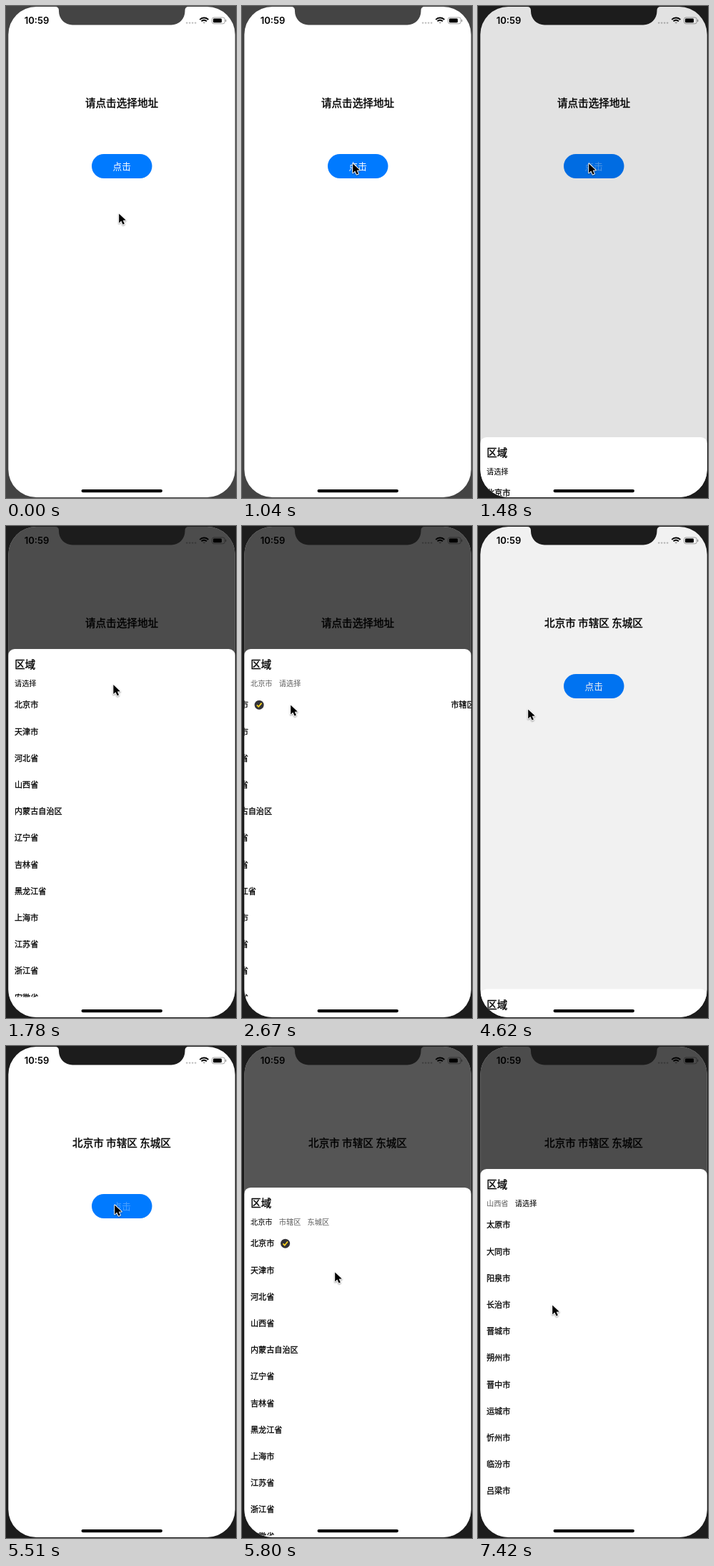
These frames come from a looping animation (322 px wide and 688 px high, 8 s). An HTML page with a canvas:

```html
<!DOCTYPE html>
<html lang="zh-CN">
<head>
<meta charset="utf-8">
<title>区域选择</title>
<style>
html, body { margin: 0; width: 100%; height: 100%; overflow: hidden; background: #1c1c1c; }
canvas { display: block; width: 322px; height: 688px; }
</style>
</head>
<body>
<canvas id="stage"></canvas>
<script>
const W = 322, H = 688, LOOP = 8000;
const TICK = 148.5;               // the screen refreshes once per tick
const PAGE = 317, SHEET = 516, ROW = 37.2;
const CJK = '"Noto Sans CJK SC", "Noto Sans CJK", sans-serif';

const provinces = '北京市 天津市 河北省 山西省 内蒙古自治区 辽宁省 吉林省 黑龙江省 上海市 江苏省 浙江省 安徽省'.split(' ');
const districts = '东城区 西城区 朝阳区 丰台区 石景山区 海淀区 门头沟区 房山区 通州区 顺义区 昌平区 大兴区'.split(' ');
const cities = '太原市 大同市 阳泉市 长治市 晋城市 朔州市 晋中市 运城市 忻州市 临汾市 吕梁市'.split(' ');

// tick, x, y of the pointer tip
const pointerPath = [
  [1, 158, 290], [7, 155, 220], [11, 155, 220], [17, 68, 250], [22, 68, 250],
  [23, 70, 254], [28, 70, 254], [29, 70, 255], [31, 70, 256], [36, 152, 222],
  [37, 152, 222], [39, 130, 316], [42, 112, 352], [43, 112, 352], [46, 104, 362]
];

const canvas = document.getElementById('stage');
const ctx = canvas.getContext('2d');
const dpr = window.devicePixelRatio || 1;
canvas.width = W * dpr;
canvas.height = H * dpr;

const clamp = v => Math.max(0, Math.min(1, v));
const ease = p => p < .5 ? 2 * p * p : 1 - 2 * (1 - p) * (1 - p);
const ramp = (k, start) => ease(clamp((k - start) * TICK / 300));

function pointerAt(k) {
  const i = pointerPath.findIndex(p => p[0] >= k);
  if (i < 0) return pointerPath[pointerPath.length - 1].slice(1);
  if (i === 0) return pointerPath[0].slice(1);
  const a = pointerPath[i - 1], b = pointerPath[i];
  const p = ease((k - a[0]) / (b[0] - a[0]));
  return [a[1] + (b[1] - a[1]) * p, a[2] + (b[2] - a[2]) * p];
}

function stateAt(k) {
  const s = {
    bezel: k < 8 ? '#444' : '#1c1c1c',
    title: k < 30 ? '请点击选择地址' : '北京市 市辖区 东城区',
    open: ramp(k, 9.42) - ramp(k, 29.38) + ramp(k, 37.3),
    label: { 10: .35, 11: .85, 37: .3, 38: .5 }[k] || 1,
    pointer: pointerAt(k)
  };
  if (k < 32) {
    s.scroll = ramp(k, 17.515) + ramp(k, 22.9);
    s.pages = [provinces, ['市辖区'], districts];
    s.picks = [k >= 17 ? 0 : -1, k >= 23 ? 0 : -1, k >= 30 ? 0 : -1];
  } else {
    s.scroll = ramp(k, 47.5);
    s.pages = [provinces, cities];
    s.picks = [k < 47 ? 0 : 3, -1];
  }
  if (k < 17) [s.tabs, s.active] = [['请选择'], 0];
  else if (k < 23) [s.tabs, s.active] = [['北京市', '请选择'], k < 20 ? -1 : 1];
  else if (k < 30) [s.tabs, s.active] = [['北京市', '市辖区', '请选择'], k < 26 ? -1 : 2];
  else if (k < 47) [s.tabs, s.active] = [['北京市', '市辖区', '东城区'], k < 32 ? 2 : 0];
  else [s.tabs, s.active] = [['山西省', '请选择'], k < 50 ? -1 : 1];
  return s;
}

function box(x, y, w, h, r, color) {
  ctx.beginPath();
  ctx.roundRect(x, y, w, h, r);
  if (color) {
    ctx.fillStyle = color;
    ctx.fill();
  }
}

function dot(x, y, r, color) {
  ctx.beginPath();
  ctx.arc(x, y, r, 0, 7);
  ctx.fillStyle = color;
  ctx.fill();
}

// y is the middle of the line; weight thickens the strokes
function text(str, x, y, size, color = '#000', weight = 0, align = 'left') {
  ctx.font = `${size}px ${CJK}`;
  ctx.textAlign = align;
  ctx.fillStyle = ctx.strokeStyle = color;
  const base = y + size * .38;
  ctx.fillText(str, x, base);
  if (weight) {
    ctx.lineWidth = weight;
    ctx.lineJoin = 'round';
    ctx.strokeText(str, x, base);
  }
}

function statusBar() {
  ctx.font = '600 13px Inter, sans-serif';
  ctx.textAlign = 'center';
  ctx.fillStyle = '#000';
  ctx.fillText('10:59', 43, 25);
  for (let i = 0; i < 4; i++) dot(253.2 + i * 4, 23.6, 1.2, '#bbb');

  ctx.strokeStyle = '#000';
  ctx.lineWidth = 2;
  ctx.lineCap = 'butt';
  for (const r of [8.2, 5]) {
    ctx.beginPath();
    ctx.arc(277.3, 24.8, r, -Math.PI * .76, -Math.PI * .24);
    ctx.stroke();
  }
  ctx.beginPath();
  ctx.moveTo(277.3, 25);
  ctx.arc(277.3, 24.8, 2.8, -Math.PI * .76, -Math.PI * .24);
  ctx.fill();

  box(288.5, 16, 17.8, 8.8, 2.6);
  ctx.strokeStyle = '#999';
  ctx.lineWidth = .9;
  ctx.stroke();
  box(290, 17.5, 12, 5.8, 1.4, '#000');
  box(307.2, 18.8, 1.2, 3.2, .6, '#999');
}

function check(x, y) {
  dot(x, y, 6.5, '#333338');
  ctx.beginPath();
  ctx.moveTo(x - 3.2, y + .2);
  ctx.lineTo(x - .9, y + 2.6);
  ctx.lineTo(x + 3.4, y - 2.6);
  ctx.strokeStyle = '#ffd51e';
  ctx.lineWidth = 1.7;
  ctx.lineJoin = 'miter';
  ctx.stroke();
}

function sheet(s) {
  const top = 688 - SHEET * s.open;
  box(3, top, 318, SHEET + 4, [9, 9, 0, 0], '#fff');
  text('区域', 12.3, top + 21.6, 14.4, '#000', .4);
  s.tabs.forEach((tab, i) =>
    text(tab, 12 + i * 39.8, top + 47.8, 10.2, i === s.active ? '#000' : '#666', .08));

  ctx.save();
  ctx.beginPath();
  ctx.rect(3, top + 58, 318, 428.5);
  ctx.clip();
  s.pages.forEach((rows, page) => {
    const x = 12 + (page - s.scroll) * PAGE;
    if (x > 322 || x < -PAGE) return;
    rows.forEach((name, i) => {
      const y = top + 78.2 + i * ROW;
      text(name, x, y, 11.1, '#000', .28);
      if (i === s.picks[page]) check(x + name.length * 11.1 + 15.3, y);
    });
  });
  ctx.restore();
}

function notch(color) {
  ctx.beginPath();
  ctx.moveTo(68, 0);
  ctx.lineTo(69, 1);
  ctx.quadraticCurveTo(74, 1, 74, 6.5);
  ctx.arcTo(74, 26.5, 94, 26.5, 19);
  ctx.arcTo(250.5, 26.5, 250.5, 6.5, 19);
  ctx.lineTo(250.5, 6.5);
  ctx.quadraticCurveTo(250.5, 1, 255.5, 1);
  ctx.lineTo(256, 0);
  ctx.fillStyle = color;
  ctx.fill();
}

function pointer([x, y]) {
  ctx.save();
  ctx.translate(x, y);
  ctx.beginPath();
  [[.2, .4], [.2, 13.4], [3.3, 10.6], [5.6, 15.6], [7.9, 14.6], [5.7, 9.8], [9.8, 9.6]]
    .forEach(p => ctx.lineTo(...p));
  ctx.closePath();
  ctx.shadowColor = 'rgba(0,0,0,.4)';
  ctx.shadowBlur = 2 * dpr;
  ctx.shadowOffsetY = dpr;
  ctx.strokeStyle = '#fff';
  ctx.lineWidth = 1.9;
  ctx.lineJoin = 'round';
  ctx.stroke();
  ctx.shadowColor = 'transparent';
  ctx.fillStyle = '#000';
  ctx.fill();
  ctx.restore();
}

function draw(s) {
  ctx.setTransform(dpr, 0, 0, dpr, 0, 0);
  ctx.fillStyle = s.bezel;
  ctx.fillRect(0, 0, W, H);

  ctx.save();
  box(3.3, 1, 317.4, 686, 39);
  ctx.clip();
  ctx.fillStyle = '#fff';
  ctx.fillRect(0, 0, W, H);
  statusBar();
  text(s.title, 162, 135.5, 14.6, '#000', .4, 'center');
  box(120, 207, 84.5, 34, 17, '#007aff');
  text('点击', 162.2, 224.2, 12.7, `rgba(255,255,255,${s.label})`, 0, 'center');
  if (s.open > 0) {
    ctx.fillStyle = `rgba(0,0,0,${.7 * s.open})`;
    ctx.fillRect(0, 0, W, H);
    sheet(s);
  }
  box(105.5, 676, 113.5, 4.2, 2.1, '#000');
  ctx.restore();

  notch(s.bezel);
  pointer(s.pointer);
}

function loop() {
  const t = performance.now() % LOOP;
  draw(stateAt(Math.floor((t + 12) / TICK)));
  requestAnimationFrame(loop);
}
loop();
</script>
</body>
</html>
```
